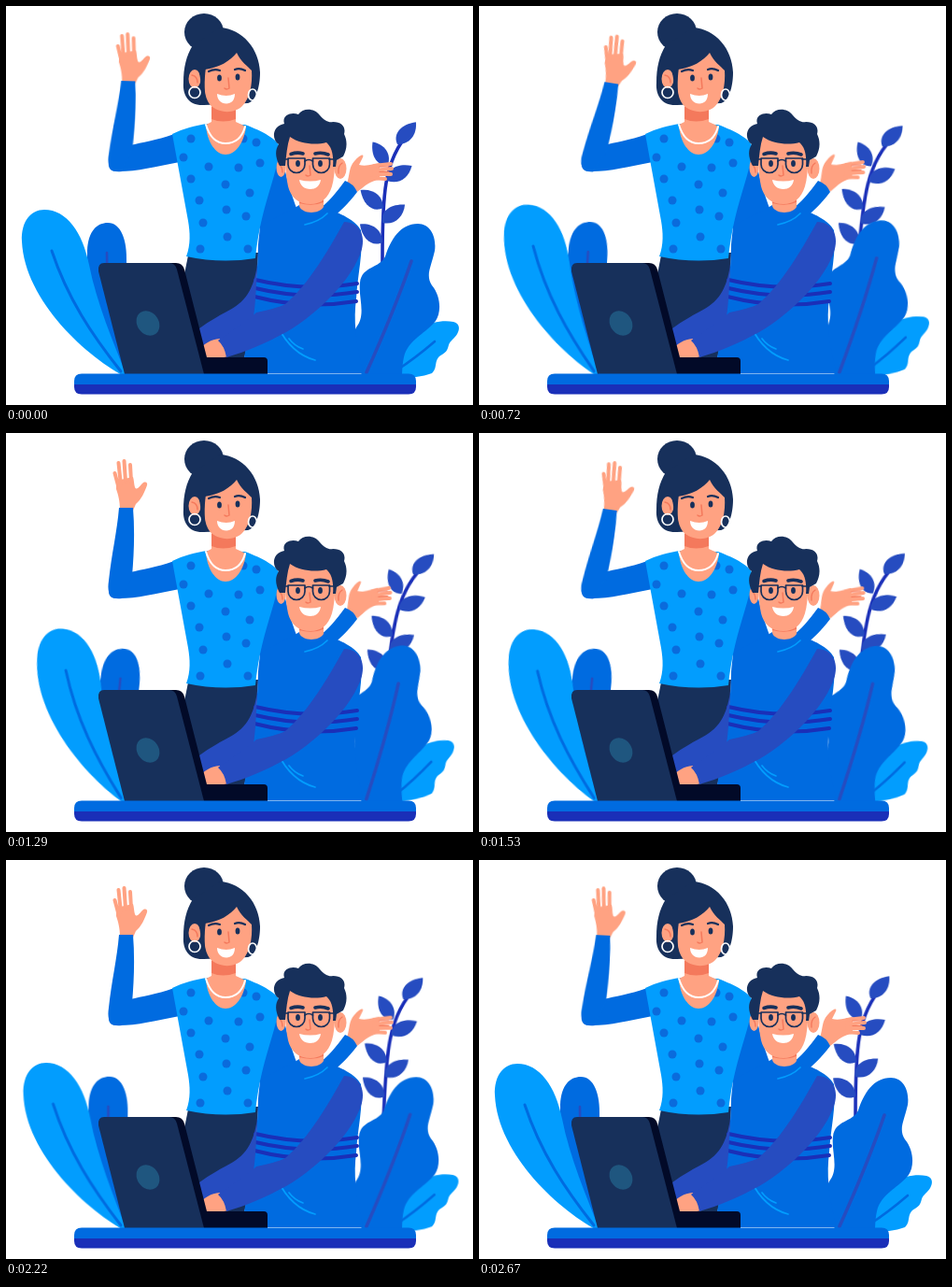
An HTML page that plays this animation: 500x427 px, repeating every 2700 ms.

```html
<!DOCTYPE html>
<html lang="en">
<head>
<meta charset="utf-8">
<title>Waving pair</title>
<style>
html, body { margin: 0; width: 100%; height: 100%; overflow: hidden; background: #fff; }
svg { display: block; width: 500px; height: 427px; }
.blue { fill: #006be0; }
.sky { fill: #029dfe; }
.royal { fill: #264cc0; }
.deep { fill: #1a2fb8; }
.navy { fill: #17305b; }
.black { fill: #020a28; }
.skin { fill: #ffa282; }
.shade { fill: #f4795c; }
.white { fill: #fff; }
.line { fill: none; stroke-linecap: round; stroke-linejoin: round; }
.line.blue { stroke: #006be0; }
.line.sky { stroke: #029dfe; }
.line.royal { stroke: #264cc0; }
.line.deep { stroke: #1a2fb8; }
.line.navy { stroke: #17305b; }
.line.skin { stroke: #ffa282; }
.line.shade { stroke: #f4795c; }
.line.white { stroke: #fff; }

.sway { animation: sway 2700ms infinite; }
.left { --turn: 6.4deg; transform-origin: 127px 393px; }
.right { --turn: -5.6deg; transform-origin: 384px 393px; }
.tall { --turn: -6.5deg; transform-origin: 384px 393px; }
.palm { --turn: -4deg; transform-origin: 367px 194px; }
.branch { transform-origin: 398px 306px; animation: branch 2700ms infinite; }
.forearm { transform-origin: 120px 165px; animation: wave 900ms -480ms infinite; }

@keyframes sway {
  0% { transform: rotate(0deg); animation-timing-function: cubic-bezier(.4, 0, .6, 1); }
  47.4% { transform: rotate(var(--turn)); animation-timing-function: cubic-bezier(.4, 0, .6, 1); }
  91.9%, 100% { transform: rotate(0deg); }
}
@keyframes branch {
  0% { transform: rotate(0deg); animation-timing-function: cubic-bezier(.25, .25, .6, .8); }
  42.6% { transform: rotate(6.5deg); animation-timing-function: cubic-bezier(.4, .2, .75, .75); }
  100% { transform: rotate(0deg); }
}
@keyframes wave {
  0% { transform: rotate(0deg); animation-timing-function: cubic-bezier(.4, 0, .6, 1); }
  31.1% { transform: rotate(9.2deg); animation-timing-function: cubic-bezier(.4, 0, .6, 1); }
  62.2%, 100% { transform: rotate(0deg); }
}
</style>
</head>
<body>
<svg viewBox="0 0 500 427">
  <defs>
    <path id="leaf" d="M0 0C5 -11 19 -11 31 0C21 10 8 10 0 0Z"/>
    <path id="lens" d="M-9 -6.500H9V0A9 9 0 0 1 -9 0Z"/>
  </defs>

  <!-- left plants -->
  <g class="sway left">
    <path class="blue" d="M126 398C97 350 86 294 87 262C88 240 98 232 109 232C123 232 130 250 129 275C128 320 130 370 126 398Z"/>
    <path class="line royal" stroke-width="2.6" d="M108 264Q107 300 117 345"/>
    <path class="sky" d="M130 398C88 377 20 316 17 252C16 230 27 218 41 218C65 218 82 242 89 277C97 318 115 360 130 398Z"/>
    <path class="line blue" stroke-width="3" d="M49 262C66 313 92 352 123 391"/>
  </g>

  <!-- branch -->
  <g class="branch">
    <path class="line deep" stroke-width="3.6" d="M403 310V270C403 205 404 165 432 135"/>
    <g class="royal">
      <use href="#leaf" transform="translate(419 148) rotate(-50)"/>
      <use href="#leaf" transform="translate(409 170) rotate(-124) scale(.95)"/>
      <use href="#leaf" transform="translate(408 187) rotate(-31)"/>
      <use href="#leaf" transform="translate(404 216) rotate(-142)"/>
      <use href="#leaf" transform="translate(403 232) rotate(-39)"/>
      <use href="#leaf" transform="translate(403 253) rotate(-141)"/>
    </g>
  </g>

  <!-- woman -->
  <path class="blue" d="M284 150L294 152C298 178 305 200 312 219L270 238C276 210 284 180 284 150Z"/>
  <path class="blue" d="M180 137C160 144 146 146 133 149L111 160C109 170 109 177 118 177C135 178 160 172 186 167Z"/>
  <g class="forearm">
    <path class="skin" d="M122 83C122 72 120 66 118 60L118 51L136 47C137 50 137 55 138 58C140 62 143 57 146 54C149 51 152 53 151 56C148 64 145 71 139 76L136 83Z"/>
    <path class="line skin" stroke-width="4" d="M121 60L116.500 43M123 56L120.500 32M128 52L126.500 30M134 52L133 34"/>
    <path class="blue" d="M121 80H136C138 105 137 130 135 153L124 177C111 179 108 171 110 158C113 130 119 105 121 80Z"/>
  </g>
  <path class="navy" d="M196 262L270 264C268 310 262 350 255 377H214L189 297Z"/>
  <path class="sky" d="M178 137C190 131 203 128 215 126L256 127C275 134 291 143 293 151C290 185 273 212 267 270Q230 276 193 268C198 255 197 242 195 230Z"/>
  <g fill="#0a6bdc">
    <circle cx="198" cy="142" r="4.5"/><circle cx="254" cy="142" r="4.5"/><circle cx="268" cy="146" r="4.5"/>
    <circle cx="190" cy="162" r="4.5"/><circle cx="217" cy="172" r="4.5"/><circle cx="249" cy="173" r="4.5"/>
    <circle cx="272" cy="168" r="4.5"/><circle cx="198" cy="185" r="4.5"/><circle cx="235" cy="191" r="4.5"/>
    <circle cx="261" cy="200" r="4.5"/><circle cx="207" cy="208" r="4.5"/><circle cx="236" cy="218" r="4.5"/>
    <circle cx="257" cy="225" r="4.5"/><circle cx="211" cy="232" r="4.5"/><circle cx="237" cy="247" r="4.5"/>
    <circle cx="208" cy="260" r="4.5"/><circle cx="259" cy="260" r="4.5"/>
  </g>
  <ellipse class="navy" cx="212" cy="28" rx="21" ry="20"/>
  <path class="navy" d="M229 23C254 25 271 46 272 71C272 88 267 102 259 104L212 106C196 107 189 96 190 82C190 66 193 53 200 42Z"/>
  <path class="skin" d="M220 100V124L214 127C215 146 225 159 235 159C246 159 255 146 257 129L246 124V100Z"/>
  <path class="shade" d="M220 108L246 106V121Q232 126 220 121Z"/>
  <path class="line white" stroke-width="2" d="M214 127C218 140 225 147 235 147C246 147 253 140 256 129"/>
  <path class="skin" d="M213 68C228 66 240 59 247 50C251 59 259 65 263 69C264 84 261 99 253 107C245 115 230 115 221 108C213 102 211 88 213 68Z"/>
  <ellipse class="skin" cx="202" cy="78" rx="6.5" ry="10"/>
  <path class="navy" d="M205 66H214C212 80 212 94 214 105L208 104C210 90 209 76 205 66Z"/>
  <path class="line shade" stroke-width="1.5" d="M199 74Q205 75 205 82"/>
  <circle class="line white" stroke-width="1.7" cx="202" cy="92.500" r="6"/>
  <ellipse class="line white" stroke-width="1.7" cx="264" cy="95" rx="4.5" ry="6"/>
  <ellipse class="navy" cx="228.500" cy="77" rx="2.4" ry="3.6"/>
  <ellipse class="navy" cx="248" cy="76" rx="2.4" ry="3.6"/>
  <path class="line navy" stroke-width="2.2" d="M217 70Q223 67 229 69M245 68Q250 66 256 69"/>
  <path class="line shade" stroke-width="1.5" d="M238 77L239 88Q236 90 234 88"/>
  <path class="white" d="M226 94Q236 98 245 94C245 101 241 104.500 236 104.500C230 104.500 226 100 226 94Z"/>

  <!-- right plants -->
  <g class="sway right">
    <path class="sky" d="M422 398C420 372 424 352 445 344C455 338 469 336 479 338C488 340 486 350 478 357C471 363 476 368 467 373C457 378 463 387 456 393C446 397 432 398 422 398Z"/>
    <path class="line blue" stroke-width="2.6" d="M418 390Q438 377 459 359"/>
  </g>
  <path class="sway tall blue" d="M384 402C372 375 370 352 375 344C386 330 377 312 379 296C381 278 400 281 406 268C412 250 422 233 441 233C455 233 461 248 459 262C455 280 449 288 456 299C466 311 466 328 460 337C450 350 434 355 427 372C424 382 424 394 424 402Z"/>

  <!-- man -->
  <g class="sway palm">
    <path class="skin" d="M365 190C368 182 367 172 373 166C378 160 384 157 382 162L378 170C386 172 394 169 400 168L400 186C390 187 385 192 376 199Z"/>
    <path class="line skin" stroke-width="4" d="M394 171L412 169M394 176L413 174M394 180L412 180M392 184L406 185"/>
    <path class="line shade" stroke-width="1.2" d="M400 172H410M400 177.500H410"/>
  </g>
  <path class="blue" d="M333 219C345 211 354 199 363 187Q372 190 376 199C367 211 356 222 345 230Z"/>
  <path class="blue" d="M272 236C285 227 300 222 314 213L340 216C358 221 375 230 380 240C383 262 376 290 375 313C372 335 374 360 383 393H255V376C264 330 269 300 270 255Z"/>
  <path class="line deep" stroke-width="4" d="M267 293Q320 306 376 297M267 302Q320 315 376 306M266 311Q320 325 375 316"/>
  <path class="line sky" stroke-width="1.7" d="M320 234Q335 231 344 222M291 343C300 361 312 374 331 379M303 356Q309 364 318 367"/>
  <path class="skin" d="M314 198V214C316 222 334 224 340 215V198Z"/>
  <path class="shade" d="M314 205H340V210Q328 215 314 211Z"/>
  <ellipse class="skin" cx="294.500" cy="173" rx="5" ry="10"/>
  <ellipse class="skin" cx="358" cy="174" rx="6.5" ry="11"/>
  <path class="line shade" stroke-width="1.4" d="M360 168Q355 171 356 179M292 169Q296 172 296 178"/>
  <path class="skin" d="M300 132H350C353 160 353 178 349 193C345 206 337 212 326 212C313 212 305 205 302 193C299 179 298 160 300 132Z"/>
  <path class="navy" d="M293 171C288 162 288 154 292 148C284 143 285 128 298 126C295 117 305 113 313 116C318 109 330 109 336 117C341 123 346 125 350 124C360 124 364 130 362 137C366 145 365 154 361 161L354 165L353 172H350C351 160 349 151 343 146C332 149 315 148 304 140C301 149 300 160 299 171Z"/>
  <path class="line navy" stroke-width="3.6" d="M305 158.500Q312 156 318 158M331 158Q338 156 345 159"/>
  <ellipse class="navy" cx="312.500" cy="168.500" rx="2.4" ry="3.6"/>
  <ellipse class="navy" cx="336.500" cy="168.500" rx="2.4" ry="3.6"/>
  <g class="line navy" stroke-width="1.7">
    <use href="#lens" x="311" y="169.500"/>
    <use href="#lens" x="337.500" y="169.500"/>
    <path d="M320 166Q324 163 328.500 166M297 164H302M346 164H353"/>
  </g>
  <path class="line shade" stroke-width="1.5" d="M325 171L326 181Q323 183 321 181"/>
  <path class="white" d="M314 186Q326 189 337 186C336 193 331 196 326 196C319 196 315 192 314 186Z"/>
  <path class="royal" d="M270 262C269 300 257 316 240 325C225 333 213 340 205 347L209 367C232 361 255 352 264 338C268 320 268 290 270 262Z"/>
  <path class="skin" d="M207 367C213 361 219 357 229 356L238 375C228 378 217 377 211 377Z"/>
  <path class="royal" d="M362 231C378 231 385 245 381 260C372 291 336 328 300 349C278 361 257 370 236 376Q234 364 227 358C245 345 262 334 268 328C281 325 291 323 299 319C324 298 346 260 362 231Z"/>
  <path class="sway tall line royal" stroke-width="3.6" d="M434 273C421 311 404 352 386 392"/>

  <!-- laptop and table -->
  <path class="black" d="M174 275H182Q189 275 191 282L215 376H276Q280 376 280 380V394H205Z"/>
  <path class="navy" d="M105 275H175Q181 275 183 282L212 394H127L99 284Q98 275 105 275Z"/>
  <ellipse cx="152" cy="339.500" rx="11.500" ry="14" fill="#1f567f" transform="rotate(-35 152 339.500)"/>
  <path class="blue" d="M81 393.400H431Q439 393.400 439 401.400V405H73V401.400Q73 393.400 81 393.400Z"/>
  <path class="deep" d="M73 405H439V407.600Q439 415.600 431 415.600H81Q73 415.600 73 407.600Z"/>
</svg>
</body>
</html>
```
